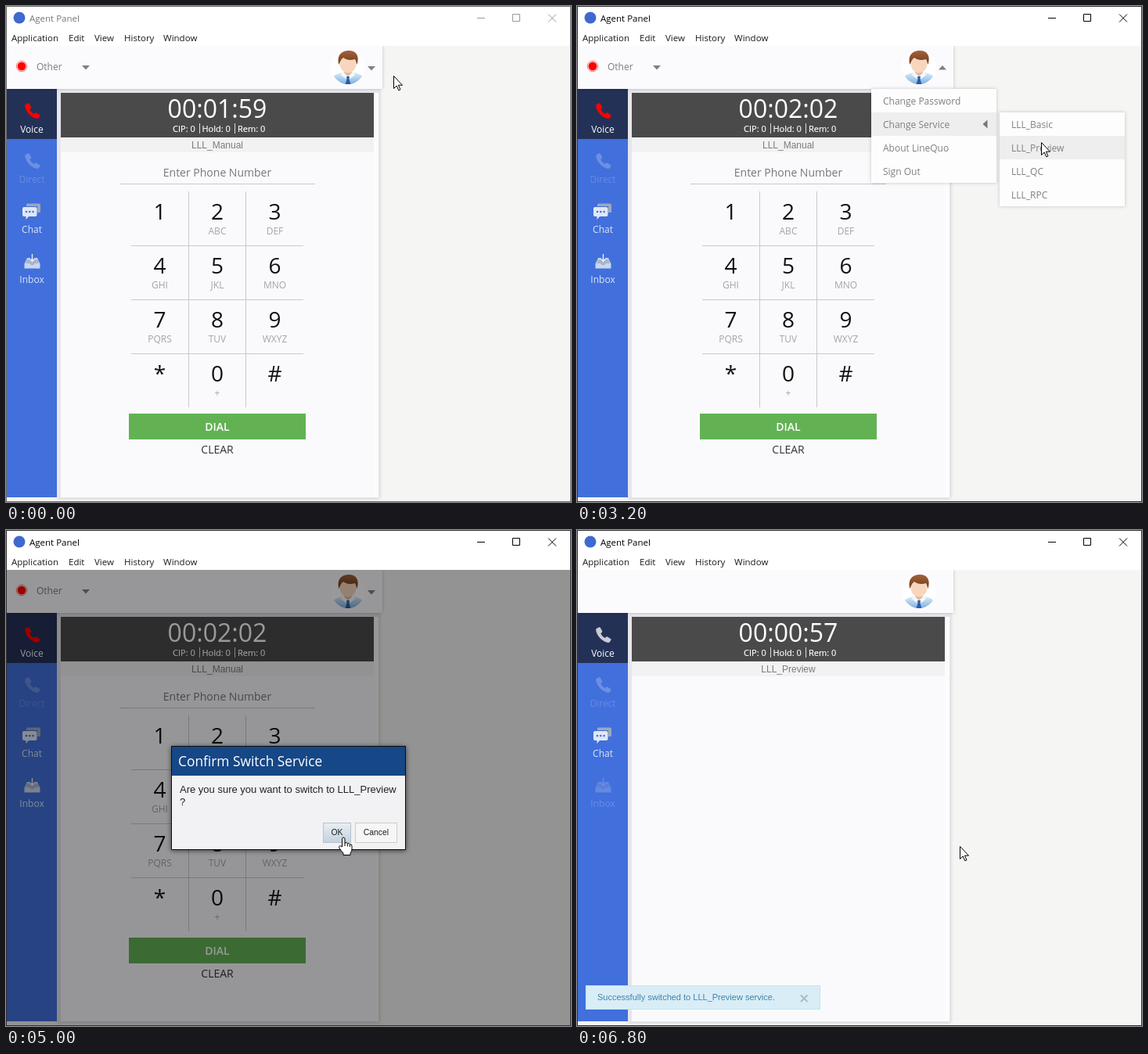
An HTML page that plays this animation: 722x634 px, repeating every 7 s.

```html
<!DOCTYPE html>
<html lang="en">
<head>
<meta charset="utf-8">
<title>Agent Panel</title>
<style>
html, body { margin: 0; width: 100%; height: 100%; overflow: hidden; background: #f5f5f4; }
svg { display: block; width: 722px; height: 634px; font-family: "Open Sans", sans-serif; }
text { white-space: pre; }
.arial { font-family: "Liberation Sans", Arial, sans-serif; }
</style>
</head>
<body>
<svg id="stage" viewBox="0 0 722 634" xmlns="http://www.w3.org/2000/svg"></svg>
<script>
const LOOP = 7000, STEP = 200;
const stage = document.getElementById('stage');

const rect = (x, y, w, h, fill, more = '') =>
  `<rect x="${x}" y="${y}" width="${w}" height="${h}" fill="${fill}" ${more}/>`;
const text = (x, y, str, size, fill, more = '') =>
  `<text x="${x}" y="${y}" font-size="${size}" fill="${fill}" ${more}>${str}</text>`;
const line = (d, stroke, more = '') =>
  `<path d="${d}" fill="none" stroke="${stroke}" ${more}/>`;
const group = (id, body, more = '') => `<g id="${id}" ${more}>${body}</g>`;
const MID = 'text-anchor="middle"', ARIAL = 'class="arial"', SHADOW = 'filter="url(#shadow)"';

const defs = `<defs>
  <filter id="shadow" x="-10%" y="-10%" width="120%" height="120%">
    <feDropShadow dx="0" dy="0" stdDeviation="2" flood-opacity=".22"/></filter>
  <filter id="deep" x="-10%" y="-10%" width="120%" height="125%">
    <feDropShadow dx="0" dy="1" stdDeviation="3" flood-opacity=".6"/></filter>
  <linearGradient id="shirt" x2="0" y2="1">
    <stop offset="0" stop-color="#dcecf8"/><stop offset="1" stop-color="#6fa9dc"/></linearGradient>
  <linearGradient id="hair" x2="0" y2="1">
    <stop offset="0" stop-color="#a4623a"/><stop offset="1" stop-color="#6d3a1c"/></linearGradient>
  <linearGradient id="hot" x2="0" y2="1">
    <stop offset="0" stop-color="#e9eef3"/><stop offset="1" stop-color="#c3d2e0"/></linearGradient>
  <clipPath id="disc"><circle cx="437" cy="79" r="21"/></clipPath>
</defs>`;

function titleBar() {
  const items = [[7, 'Application'], [80, 'Edit'], [113, 'View'], [151, 'History'], [201, 'Window']];
  return rect(0, 0, 722, 51, '#fff') +
    '<circle cx="17" cy="15" r="7.5" fill="#3f69cf"/>' +
    text(30, 20, 'Agent Panel', 11.5, '#000', 'id="title"') +
    line('M602 15.5H612M647.5 10.5H656.5V19.5H647.5ZM693 10.5L703 20.5M703 10.5L693 20.5', '#000', 'id="buttons"') +
    items.map(([x, s]) => text(x, 45, s, 11.5, '#1a1a1a')).join('');
}

function avatar() {
  return '<circle cx="437" cy="79" r="22" fill="#fff"/><g clip-path="url(#disc)">' +
    '<path d="M414 102C414 90 421 87 430 85H444C453 87 460 90 460 102Z" fill="url(#shirt)"/>' +
    '<path d="M430 84L437 90 444 84 446 88 440 93 437 90 434 93 428 88Z" fill="#f4f9fd"/>' +
    '<path d="M435 90H439L438.300 93 440.500 100H433.500L435.700 93Z" fill="#2a5cab"/></g>' +
    '<path d="M432 79H442V85L437 90 432 85Z" fill="#e9b795"/>' +
    '<ellipse cx="437" cy="73.500" rx="10.500" ry="12" fill="#f8d6bd"/>' +
    '<path d="M425.500 75C422 62 430 57 438 57C448 57 452 64 448.500 75C447.500 73 447.500 70 446 68C440 70 435 69 431 66C428 68 427 71 425.500 75Z" fill="url(#hair)"/>';
}

const phone = (id, y, fill) =>
  `<path id="${id}" transform="translate(24 ${y})" fill="${fill}" d="M1.200 1.800L4.200 .3Q5.300 0 5.900 1L8.200 5.200Q8.500 6.200 7.700 6.900L6.200 8.200Q8 11.800 11.700 14.100L13.200 12.700Q14 12 14.900 12.500L19 14.900Q20 15.600 19.500 16.600L17.800 19.200Q17 20.200 15.500 20Q8.500 18.500 4 12.500Q0 7 .2 3.300Q.3 2.300 1.200 1.800Z"/>`;

function sidebar() {
  const label = (y, s, fill, id) => text(33, y, s, 12, fill, `${MID} id="${id}"`);
  const chat = '<path d="M27 252.500H42Q44 252.500 44 254.500V264H40V256H26V253.500Z" fill="#9da8b8"/>' +
    '<path d="M23 257H37.500Q39.500 257 39.500 259V267Q39.500 269 37.500 269H29L25.500 273V269H23Q21 269 21 267V259Q21 257 23 257Z" fill="#dfe8f7"/>' +
    [26, 30.3, 34.6].map(x => `<circle cx="${x}" cy="263" r="1.300" fill="#416fdc"/>`).join('');
  const inbox = '<path d="M27 322H31V324H28L26 329H30.500Q33.500 333 36.500 329H41L39 324H36V322H40L43.500 329.500V335.500H23.500V329.500Z" fill="#c9d6ee"/>' +
    '<path d="M26.500 324H40.500L42 329H37Q33.500 333 30 329H25Z" fill="#a6b5ce"/>' +
    '<path d="M32.800 317H34.200V323.500H37L33.500 327.500 30 323.500H32.800Z" fill="#e6edf8"/>';
  return rect(1, 106, 64, 522, '#416fdc') + rect(1, 106, 64, 64, '#243156') +
    phone('voice', 124, '#f00') + label(162, 'Voice', '#fff', 'voiceLabel') +
    phone('direct', 188, '#6a8fe4') + label(226, 'Direct', '#668be2', 'directLabel') +
    chat + label(290, 'Chat', '#dbe5f9', 'chatLabel') +
    group('inbox', inbox + label(354, 'Inbox', '#dbe5f9', 'inboxLabel'));
}

function keypad() {
  const keys = ['1', '2ABC', '3DEF', '4GHI', '5JKL', '6MNO', '7PQRS', '8TUV', '9WXYZ', '*', '0+', '#'];
  const cells = keys.map((k, i) => {
    const x = 196.5 + i % 3 * 73.5, y = 273 + Math.floor(i / 3) * 69;
    return text(x, y, k[0], 28, '#111', MID) + text(x, y + 19, k.slice(1), 12, '#a5a5a8', MID);
  });
  return text(270, 218, 'Enter Phone Number', 14, '#777', MID) +
    line('M145 227.500H395M233.500 237V513M306.500 237V513M160 306.500H380M160 375.500H380M160 444.500H380', '#c9c9cb') +
    cells.join('') + rect(157, 521, 226, 33, '#62b254') +
    text(270, 543, 'DIAL', 14, '#fff', MID + ' font-weight="600"') +
    text(270, 572, 'CLEAR', 14, '#333', MID);
}

function panel() {
  const stats = [[213, 'CIP: 0'], [250.5, 'Hold: 0'], [296, 'Rem: 0']];
  return rect(65, 106, 412, 523, '#e6e6ec', SHADOW) +
    rect(70, 111, 406, 517, '#fafafd') + rect(470, 111, 6, 517, '#fdfbfb') +
    rect(70, 111, 400, 57, '#4a4a4a') + rect(70, 168, 400, 19, '#f2f2f3') +
    text(270, 143, '', 32, '#fff', MID + ' id="clock"') +
    stats.map(([x, s]) => text(x, 161, s, 11, '#fff', 'stroke="#fff" stroke-width=".2"')).join('') +
    line('M247.500 150V163M292.500 150V163', '#ddd') +
    text(270, 182, '', 12, '#7c7c7c', `${MID} ${ARIAL} id="service"`) +
    group('keypad', keypad());
}

function header() {
  return rect(1, 51, 480, 55, '#fbfafd', SHADOW) +
    group('status', '<circle cx="20" cy="77" r="6.800" fill="#fff" stroke="#f77" stroke-width="1"/>' +
      '<circle cx="20" cy="77" r="5.500" fill="#f00"/>' +
      text(39, 82, 'Other', 12, '#7d7d7d') + '<path d="M97 76H107L102 81.500Z" fill="#808080"/>') +
    avatar() + '<path id="caret" fill="#808080"/>';
}

function menuBox(id, x, y, items) {
  return group(id, rect(x, y, 160, items.length * 30, '#fdfdfd', SHADOW) +
    rect(x, y, 160, 30, '#eee', `id="${id}Hover"`) +
    items.map((s, i) => text(x + 15, y + 20 + i * 30, s, 12, '#808080')).join('') +
    (id === 'menu' ? '<path id="pointer" d="M-3 0L3 -5.500V5.500Z" fill="#777"/>' : ''));
}

function dialog() {
  const button = (x, w, s, id) =>
    rect(x + .5, 374.5, w - 1, 25, '#f6f6f6', `stroke="#ccc" id="${id}"`) +
    text(x + w / 2, 390, s, 10.4, '#222', `${MID} ${ARIAL}`);
  return group('dialog', rect(211.5, 276.5, 299, 132, '#f2f2f4', 'stroke="#111" filter="url(#deep)"') +
    rect(212, 277, 298, 37, '#164786') +
    text(220, 302, 'Confirm Switch Service', 17.33, '#fff') +
    text(222, 336, 'Are you sure you want to switch to LLL_Preview', 13, '#222', ARIAL) +
    text(222, 352, '?', 13, '#222', ARIAL) +
    button(405, 36, 'OK', 'ok') + button(446, 54, 'Cancel', 'cancel'));
}

const toast = () => group('toast',
  rect(11.5, 582.5, 299, 30, '#d9edf7', 'stroke="#bce8f1"') +
  text(26, 601, 'Successfully switched to LLL_Preview service.', 11, '#3f84aa', ARIAL) +
  line('M286 594.500L294.500 603M294.500 594.500L286 603', '#a9bcc6', 'stroke-width="2"'));

const pointers = () => group('cursor',
  '<path id="arrow" d="M.5 .5V16.500L4.200 13L6.800 18.800 9 17.800 6.400 12.200H11.500Z"/>' +
  '<g id="hand"><path d="M-1.500 12V1.800Q-1.500 0 .2 0T2 1.800V7Q4.800 5.600 5.300 7.800Q7.800 6.800 8.300 8.800Q11 8.300 11 11V15Q11 18 9 20V22.500H0V20Q-3 17 -5 13.500Q-6 11.500 -4.500 10.800Q-3.500 10.300 -1.500 12Z"/>' +
  line('M2 7V11M5.300 8V11.500M8.300 9V12', '#000') + '</g>',
  'fill="#fff" stroke="#000" stroke-linejoin="round"');

stage.innerHTML = defs + rect(0, 0, 722, 634, '#f5f5f4') + panel() + sidebar() + header() + titleBar() +
  menuBox('menu', 376, 106, ['Change Password', 'Change Service', 'About LineQuo', 'Sign Out']) +
  menuBox('sub', 540, 136, ['LLL_Basic', 'LLL_Preview', 'LLL_QC', 'LLL_RPC']) +
  rect(1, 51, 720, 582, '#000', 'id="shade"') + dialog() + toast() +
  '<path id="spinner" d="M-30 0A30 30 0 0 1 30 0A30 27.300 0 0 0 -30 0Z" fill="#fff"/>' +
  rect(.5, .5, 721, 633, 'none', 'id="frame"') + pointers();

const el = {};
stage.querySelectorAll('[id]').forEach(n => el[n.id] = n);
const set = (id, key, value) => el[id].setAttribute(key, value);
const show = (id, on) => set(id, 'display', on ? 'inline' : 'none');

// time, x, y
const path = [[0, 495, 89], [200, 495, 89], [800, 468, 80], [1000, 468, 80], [1600, 470, 148],
  [2000, 470, 148], [2800, 593, 174], [3600, 593, 174], [4800, 431, 393], [6200, 431, 393], [6800, 489, 404]];

function cursorAt(t) {
  const i = path.findIndex(p => p[0] > t);
  if (i < 0) return path[path.length - 1].slice(1);
  const [t0, x0, y0] = path[i - 1], [t1, x1, y1] = path[i];
  const u = (t - t0) / (t1 - t0), e = u * u * (3 - 2 * u);
  return [x0 + (x1 - x0) * e, y0 + (y1 - y0) * e];
}

const inside = (x, y, l, t, w, h) => x >= l && x < l + w && y >= t && y < t + h;

function hover(id, on, x, y, left, top) {
  const row = Math.floor((y - top) / 30);
  const over = on && inside(x, y, left, top, 160, 120);
  show(id + 'Hover', over);
  if (over) set(id + 'Hover', 'y', top + row * 30);
  return over;
}

function draw(ms) {
  const t = Math.floor(ms / STEP) * STEP;
  const [x, y] = cursorAt(t);
  const active = t >= 800, menu = t >= 1000 && t < 3400, sub = t >= 1600 && menu;
  const asking = t >= 3400 && t < 5200, busy = t >= 5200 && t < 6200, done = t >= 6200;

  set('title', 'fill', active ? '#000' : '#777');
  set('buttons', 'stroke', active ? '#000' : '#999');
  set('frame', 'stroke', active ? '#333' : '#6b6b6b');

  const secs = done ? (t < 6600 ? 56 : 57) : 119 + (t >= 400) + (t >= 1000) + (t >= 1600);
  const two = n => String(n).padStart(2, '0');
  el.clock.textContent = `00:${two(Math.floor(secs / 60))}:${two(secs % 60)}`;
  el.service.textContent = done ? 'LLL_Preview' : 'LLL_Manual';

  show('keypad', !done);
  show('status', !done);
  show('caret', !done);
  set('caret', 'd', t >= 1000 && t < 3800 ? 'M462 81.500H472L467 76Z' : 'M462 77H472L467 82.500Z');
  set('voice', 'fill', done ? '#c9ccd3' : '#f00');
  set('inbox', 'opacity', done ? .25 : 1);

  show('menu', menu);
  show('sub', sub);
  const overMenu = hover('menu', menu, x, y, 376, 106);
  hover('sub', sub, x, y, 540, 136);
  if (sub && !overMenu) {
    show('menuHover', true);
    set('menuHover', 'y', 136);
  }
  show('pointer', sub);
  const turn = t < 1800 ? 180 : t < 2000 ? 70 : 0;
  set('pointer', 'transform', `translate(521.500 151) rotate(${turn}) scale(${t === 1800 ? .8 : 1})`);

  show('shade', asking || busy);
  set('shade', 'opacity', busy ? .5 : .4);
  show('dialog', asking);
  const overOk = asking && inside(x, y, 405, 374, 36, 26);
  set('ok', 'fill', overOk ? 'url(#hot)' : '#f6f6f6');
  set('ok', 'stroke', overOk ? '#b3c2d0' : '#ccc');

  show('spinner', busy);
  set('spinner', 'transform', `translate(361 342.500) rotate(${24 + (t - 5400) / STEP * 72})`);
  show('toast', t >= 6400);

  const hand = overMenu || overOk || (t < 1200 && inside(x, y, 415, 57, 60, 46));
  show('hand', hand);
  show('arrow', !hand);
  set('cursor', 'transform', `translate(${Math.round(x)} ${Math.round(y)})`);
}

const start = performance.now();
function tick() {
  draw((performance.now() - start) % LOOP);
  requestAnimationFrame(tick);
}
tick();
</script>
</body>
</html>
```
